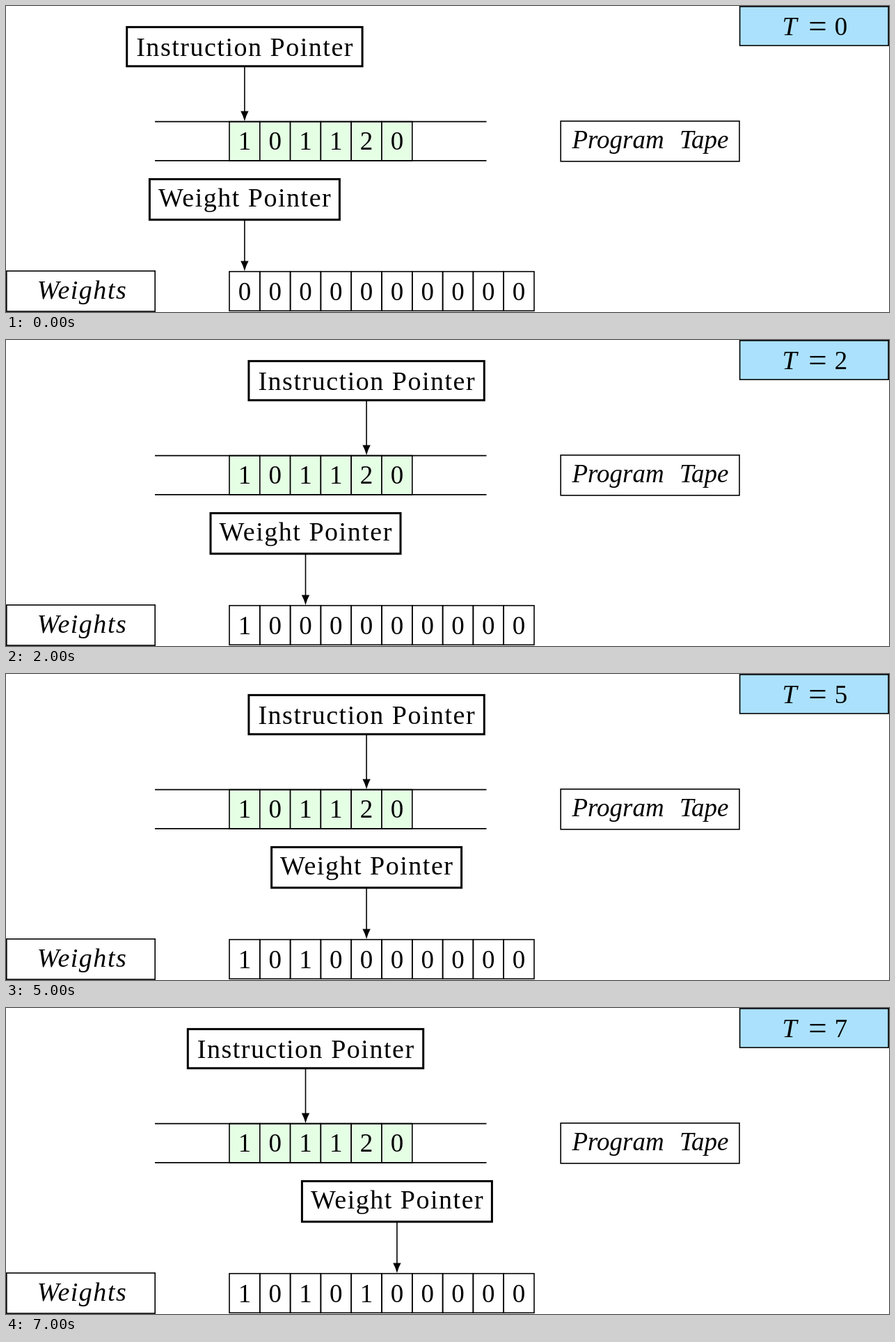
Recreate the animation shown at these times as an HTML page. Size 1269 by 441 pixels, loop 8 s.

```html
<!DOCTYPE html>
<html lang="en">
<head>
<meta charset="utf-8">
<title>Program tape and weights</title>
<style>
  html, body { margin: 0; width: 100%; height: 100%; overflow: hidden; background: #fff; }
  svg { display: block; width: 1269px; height: 441px; }
  text { font: 38px "Liberation Serif", serif; text-anchor: middle; fill: #000; }
  .label { letter-spacing: .04em; }
  .it { font-style: italic; }
  .title { font-size: 37px; word-spacing: .35em; }
  .sign { font-size: 47px; }
  .digit { font-size: 37px; }
  rect, .line { fill: none; stroke: #000; stroke-width: 1.6; }
  .thick { stroke-width: 3; }
</style>
</head>
<body>
<svg id="stage" viewBox="0 0 1269 441"></svg>
<script>
const STEP = 1000, LOOP = 8000;
const LEFT = 321, CELL = 43.8, MID = LEFT + CELL / 2;
const TAPE = [1, 0, 1, 1, 2, 0];
const stage = document.getElementById("stage");

function add(parent, tag, attrs, content = "") {
  const el = document.createElementNS("http://www.w3.org/2000/svg", tag);
  for (const key in attrs) el.setAttribute(key, attrs[key]);
  el.textContent = content;
  return parent.appendChild(el);
}

function box(parent, x, y, width, height, style = "") {
  return add(parent, "rect", { x, y, width, height, style });
}

function label(parent, x, y, content, cls) {
  return add(parent, "text", { x, y, class: cls }, content);
}

function cells(values, y, height, baseline, fill) {
  return values.map((value, i) => {
    box(stage, LEFT + i * CELL, y, CELL, height, `fill:${fill}`);
    return label(stage, MID + i * CELL, baseline, value, "digit");
  });
}

// A framed caption with an arrow down to the cell it points at.
function pointer(name, width, top, bottom, baseline, tip) {
  const g = add(stage, "g", {});
  box(g, MID - width / 2, top, width, bottom - top).setAttribute("class", "thick");
  label(g, MID + .7, baseline, name, "label");
  add(g, "path", { class: "line", d: `M${MID} ${bottom}V${tip - 12}` });
  add(g, "path", { d: `M${MID} ${tip}q-2 -8 -5.7 -14.5h11.4q-3.7 6.5 -5.7 14.5z` });
  return g;
}

cells(TAPE, 166.6, 56.3, 207, "#e5ffe5");
add(stage, "path", { class: "line", d: "M214 166.6H690.5M214 222.9H690.5" });
const weights = cells(Array(10).fill(0), 382.7, 56.6, 424, "none");

box(stage, 797.2, 165.9, 256.8, 58);
label(stage, 926, 205, "Program Tape", "it title");
box(stage, .8, 381.9, 213.4, 58.2);
label(stage, 109.5, 421.5, "Weights", "it label");

box(stage, 1054.6, .8, 213.6, 56.2, "fill:#abe1fd");
label(stage, 1126, 42, "T", "it");
label(stage, 1166.5, 43.5, "=", "sign");
const clock = label(stage, 1200, 42, 0, "digit");

const instruction = pointer("Instruction Pointer", 338.4, 30.4, 86.8, 71.5, 166);
const weight = pointer("Weight Pointer", 273, 249.6, 308, 289, 382);

function slide(el, index) {
  el.setAttribute("transform", `translate(${index * CELL} 0)`);
}

// Three instructions per pass: write and advance, advance, jump back.
function draw(ms) {
  const t = Math.floor((ms % LOOP) / STEP);
  const pos = 2 * Math.floor(t / 3) + t % 3;
  clock.textContent = t;
  slide(instruction, 2 * (t % 3));
  // The jump leaves the weight pointer where it is.
  slide(weight, pos);
  weights.forEach((el, i) => {
    el.textContent = i % 2 === 0 && i < pos ? 1 : 0;
  });
}

const start = performance.now();
function tick() {
  draw(performance.now() - start);
  requestAnimationFrame(tick);
}
tick();
</script>
</body>
</html>
```
